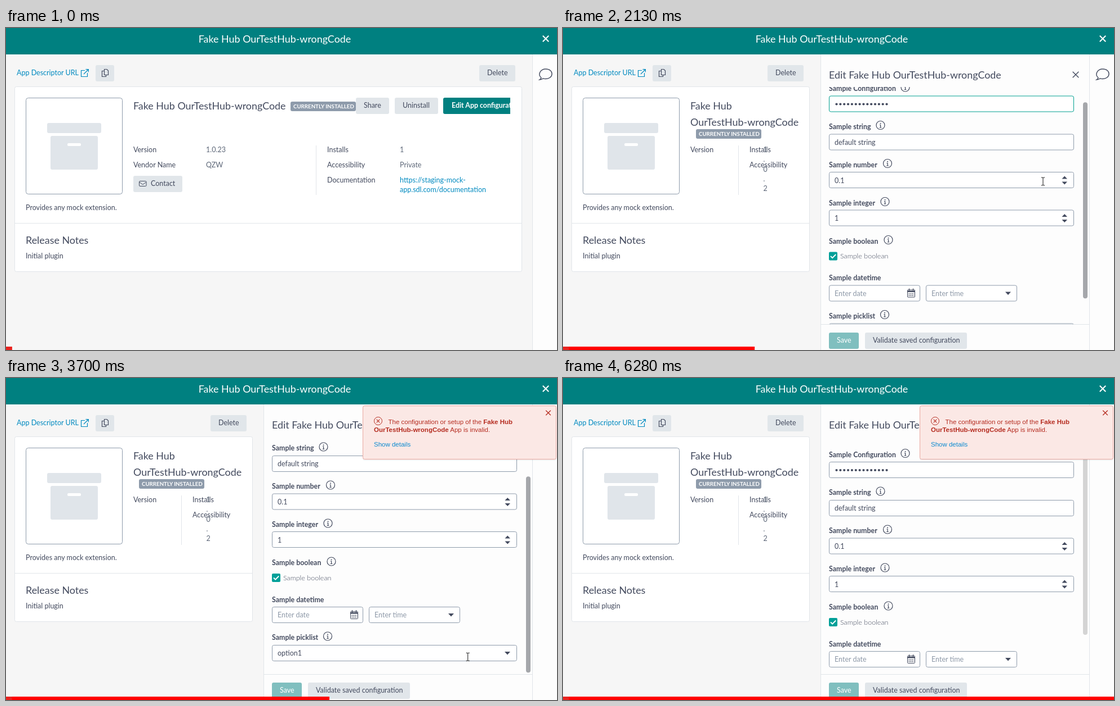
Write an HTML page that moves like this. It is 978 px wide and 573 px high and loops after 6.35 s.

```html
<!DOCTYPE html>
<html lang="en">
<head>
<meta charset="utf-8">
<title>App configuration</title>
<style>
html, body { margin: 0; width: 100%; height: 100%; overflow: hidden; background: #f6f6f6; }
svg { display: block; width: 978px; height: 573px; }
text { font-family: Lato, sans-serif; font-size: 12.5px; fill: #434a5e; white-space: pre; }
.title { font-size: 17.9px; }
.bold { font-size: 12.4px; font-weight: 700; }
.thin { font-weight: 300; }
.badge { font-size: 9.7px; font-weight: 700; fill: #fff; }
.soft { fill: #5d6778; }
.hint { fill: #8e99a8; }
.link { fill: #008ac0; }
.white { fill: #fff; }
.alert { font-family: "Liberation Sans", Arial, sans-serif; font-size: 11.5px; fill: #b52c20; }
.alert.link { fill: #0a8ad0; }
.strong { font-weight: 700; }
</style>
</head>
<body>
<svg id="stage" viewBox="0 0 978 573" xmlns="http://www.w3.org/2000/svg"></svg>
<script>
const LOOP = 6350, STEPS = 92, W = 978;
const INK = '#434a5e', LINE = '#e1e5e9', EDGE = '#8e9bab', TEAL = '#008080', GREY = '#e1e6ea';
const KIND = 'Fake Hub', KEY = 'OurTestHub-wrongCode', NAME = KIND + ' ' + KEY;

// Recorder clock: [ms, step]
const CLOCK = [[0, 0], [70, 1], [680, 10], [1360, 20], [2060, 30], [2740, 40], [3360, 49], [3450, 50],
  [4060, 59], [4760, 69], [5450, 79], [6140, 89], [6280, 91], [LOOP, STEPS]];
const SCROLL = [[29, 0], [31, 28.5], [34, 79], [64, 79], [69, 17], [71, 0]];
const MOUSE_X = [[4, 926], [10, 908], [14, 845], [21, 845], [31, 852], [38, 699], [46, 699], [54, 837],
  [60, 882], [69, 879], [80, 880], [87, 944]];
const MOUSE_Y = [[4, 573], [10, 396], [14, 135], [21, 135], [31, 273], [38, 554], [46, 554], [54, 488],
  [60, 414], [69, 410], [80, 415], [87, 573]];

function at(keys, x) {
  if (x <= keys[0][0]) return keys[0][1];
  for (let i = 1; i < keys.length; i++) {
    const [x0, y0] = keys[i - 1], [x1, y1] = keys[i];
    if (x <= x1) return y0 + (y1 - y0) * (x - x0) / (x1 - x0);
  }
  return keys[keys.length - 1][1];
}

const text = (x, y, s, cls = '', extra = '') => `<text x="${x}" y="${y}" class="${cls}" ${extra}>${s}</text>`;
const rect = (x, y, w, h, fill, r = 0, stroke = 'none') =>
  `<rect x="${x}" y="${y}" width="${w}" height="${h}" rx="${r}" fill="${fill}" stroke="${stroke}"/>`;
const stroke = (d, color = INK, w = 1.2, extra = '') =>
  `<path d="${d}" fill="none" stroke="${color}" stroke-width="${w}" ${extra}/>`;
const shape = (d, fill = INK) => `<path d="${d}" fill="${fill}"/>`;
const cross = (x, y, r, color, w) => stroke(`M${x - r} ${y - r}l${2 * r} ${2 * r}m0 ${-2 * r}l${-2 * r} ${2 * r}`, color, w);
const button = (x, y, w, label, dx = 14, fill = GREY, cls = '') =>
  rect(x, y, w, 29, fill, 3) + text(x + dx, y + 18, label, cls);
const badge = (x, y) => rect(x, y, 116, 17, EDGE, 3) + text(x + 5, y + 12, 'CURRENTLY INSTALLED', 'badge');

function shell() {
  return rect(0, 0, W, 573, '#f6f6f6') + rect(935, 47, 43, 526, '#fdfdfd') +
    stroke('M934.5 47V573', LINE, 1) + rect(0, 0, W, 47, TEAL) +
    text(477, 26, NAME, 'title white', 'text-anchor="middle"') + cross(958, 19, 5.2, '#fff', 2) +
    stroke('M950 88.500C943 82 949 73 958 73C965 73 969 77 969 81.500C969 87 964 90.500 958 90.500Q955.500 90.500 953.500 89.800Q950.500 92 947 92Q949.500 90.500 950 88.500Z', INK, 1.4);
}

function leftSide(open) {
  const right = open ? 437 : 915;
  return text(19, 84, 'App Descriptor URL', 'link') +
    stroke('M140 75.500H133.500V86.500H144.500V80M138 82L146 74M141.500 73.600H146.300V78.500', '#008ac0', 1.2) +
    rect(159, 66, 33, 29, GREY, 3) +
    stroke('M174.500 73.500H179L181.500 76V83.500H174.500ZM174 76.500H170.500V86.500H177.500V84', INK, 1.2) +
    button(open ? 363 : 840, 66, 64, 'Delete') +
    rect(15.5, 104.5, right - 15, 329, '#fff', 3, LINE) + stroke(`M16 347.500H${right}`, LINE, 1) +
    rect(35.5, 124.5, 171, 171, '#fff', 4, EDGE) +
    rect(73, 169, 96, 18, '#e0e5ea', 3) + rect(79, 192, 84, 60, '#e0e5ea', 3) + rect(109, 205, 24, 5, '#fff', 2) +
    text(35, 324, 'Provides any mock extension.') +
    text(35, 384, 'Release Notes', 'title') + text(35, 410, 'Initial plugin') +
    (open ? narrowDetails() : wideDetails());
}

function wideDetails() {
  const rows = [[226, 221, 'Version'], [226, 248, 'Vendor Name'], [570, 221, 'Installs'],
    [570, 248, 'Accessibility'], [570, 275, 'Documentation']];
  const values = [[355, 221, '1.0.23'], [355, 248, 'QZW'], [699, 221, '1'], [699, 248, 'Private']];
  return text(226, 145, NAME, 'title') + badge(505, 131) +
    button(621, 124, 59, 'Share') + button(690, 124, 77, 'Uninstall') +
    `<g clip-path="url(#card)">${button(776, 124, 160, 'Edit App configuration', 15, TEAL, 'bold white')}</g>` +
    rows.map(r => text(...r)).join('') + values.map(v => text(...v, 'soft')).join('') +
    text(699, 275, 'https://staging-mock-', 'link') + text(699, 292, 'app.sdl.com/documentation', 'link') +
    stroke('M550.500 209V297', LINE, 1) + button(226, 263, 87, 'Contact', 31) +
    rect(236.5, 272.5, 12.5, 9, 'none', 1.5, INK) + stroke('M237 274.500L242.750 278.500L248.500 274.500', INK, 1);
}

function narrowDetails() {
  return text(226, 145, KIND, 'title') + text(226, 174, KEY, 'title') + badge(236, 180) +
    text(226, 221, 'Version') + text(331, 221, 'Installs') + text(331, 248, 'Accessibility') +
    stroke('M311.500 209V297', LINE, 1) +
    [...'1.0.2'].map((c, i) => text(355.5, 221 + i * 17.25, c, 'soft')).join('');
}

const input = (x, y, w, edge = EDGE) => rect(x + .5, y + .5, w - 1, 28, '#fff', 3, edge);
const down = (x, y) => shape(`M${x - 5} ${y}h10l-5 5.500z`);
const spinButtons = y => shape(`M885.500 ${y - 2.5}h9.500l-4.750 -5z`) + shape(`M885.500 ${y + 2.5}h9.500l-4.750 5z`);

function label(y, s, iconX) {
  const icon = iconX ? `<circle cx="${iconX}" cy="${y - 2}" r="7.500" fill="none" stroke="${INK}" stroke-width="1.200"/>` +
    rect(iconX - .8, y - 6, 1.7, 1.7, INK) +
    stroke(`M${iconX - 1.5} ${y - 2.5}h1.600v4.500m-1.800 0h3.500`, INK, 1.2) : '';
  return text(472, y + 4.5, s, 'bold') + icon;
}

function form(focused, caret) {
  let dots = '';
  for (let i = 0; i < 14; i++) dots += `<circle cx="${485.5 + i * 6.85}" cy="164" r="2.100" fill="${INK}"/>`;
  return label(136, 'Sample Configuration', 607.5) + input(472, 149, 435, focused ? '#00a090' : EDGE) + dots +
    (caret ? stroke('M482.500 156V172', '#222', 1) : '') +
    label(203.5, 'Sample string', 563.5) + input(472, 217, 435) + text(482, 236, 'default string') +
    label(271.5, 'Sample number', 576) + input(472, 284.5, 435) + text(482, 304, '0.1') + spinButtons(299.5) +
    label(339.5, 'Sample integer', 571.5) + input(472, 352, 435) + text(482, 371.5, '1') + spinButtons(367) +
    label(407.5, 'Sample boolean', 577.5) + rect(472, 427, 15, 15, '#00a099', 2) +
    stroke('M475 434.500l3.200 3.200l6 -6.200', '#fff', 1.8) + text(492, 438.5, 'Sample boolean', 'thin') +
    label(473, 'Sample datetime') + input(472, 486, 162) + text(482, 505, 'Enter date', 'hint') + calendar() +
    input(644, 486, 162) + text(654, 505, 'Enter time', 'hint') + down(790, 498) +
    label(540.5, 'Sample picklist', 571) + input(472, 554, 435) + text(482, 573, 'option1') + down(890, 566);
}

function calendar() {
  return rect(611.5, 494.5, 13, 13, 'none', 1, INK) + rect(611.5, 496, 13, 2.5, INK) +
    stroke('M614.500 492V496M621.500 492V496', INK, 1.3) +
    stroke('M613.500 501.500H623M613.500 504.500H623', INK, 1.6, 'stroke-dasharray="1.700 1.200"');
}

function panel(k) {
  const scroll = at(SCROLL, k), busy = k >= 41 && k <= 47;
  return rect(457, 47, 477, 526, '#fdfdfd') + stroke('M457.500 47V573', LINE, 1) +
    text(472, 90, 'Edit ' + NAME, 'title') + cross(910, 83, 5.3, INK, 1.4) +
    `<g clip-path="url(#view)"><g transform="translate(0 ${-scroll})">${form(k < 39, k < 39 && (k - 16) % 16 < 8)}</g></g>` +
    rect(923, 108 + scroll * .85, 8, 349, k < 90 ? '#a5a7ab' : '#d4d4d4', 4) +
    stroke('M458 527.500H934', LINE, 1) +
    button(472, 542, 53, 'Save', 14, '#80bfbf', 'white') + button(536, 542, 181, 'Validate saved configuration') +
    (busy ? rect(458, 47, 476, 526, 'rgba(253,253,253,.42)') + spinner(k) : '');
}

function spinner(k) {
  return stroke('M-12.500 6.400A14 14 0 1 1 7.800 11.600', TEAL, 2,
    `transform="translate(695 316) rotate(${(k - 44) * 40})"`);
}

function alertBox(k) {
  const alpha = Math.min(1, (k - 47) / 4);
  return `<g opacity="${alpha}">` + rect(633, 49, 344, 98, 'rgba(0,0,0,.05)', 4) +
    rect(633.5, 49.5, 343, 95, '#fbe8e5', 3, '#e9a8a1') +
    `<circle cx="660.500" cy="76.500" r="7" fill="none" stroke="#b52c20"/>` + cross(660.5, 76.5, 2.8, '#b52c20', 1.1) +
    text(678.5, 82, `The configuration or setup of the <tspan class="strong">${KIND}</tspan>`, 'alert') +
    text(653, 95.5, `<tspan class="strong">${KEY}</tspan> App is invalid.`, 'alert') +
    text(653, 122, 'Show details', 'alert link') + cross(962.5, 62, 4.3, '#b52c20', 1.3) + '</g>';
}

function cursor(k) {
  if (k < 4 || k > 86) return '';
  const beam = (k >= 23 && k <= 33) || (k >= 51 && k <= 56);
  const d = beam ? 'M-3 -7h2.300l.7 .7l.7 -.7h2.300M0 -6.500v13M-3 7h2.300l.7 -.7l.7 .7h2.300' :
    'M.500 .500V15.500L4 12.200L6.600 18L9.200 16.900L6.700 11.200H11Z';
  return `<path d="${d}" fill="${beam ? 'none' : '#fff'}" stroke="#111" transform="translate(${at(MOUSE_X, k)} ${at(MOUSE_Y, k)})"/>`;
}

function progress(k) {
  const step = W / STEPS;
  return rect(0, 567, step * (k + 1), 6, '#ff0000') + rect(0, 567, step, 6, '#e8231f');
}

const stage = document.getElementById('stage');
const clips = '<defs><clipPath id="card"><rect x="776" y="120" width="119" height="40"/></clipPath>' +
  '<clipPath id="view"><rect x="458" y="105" width="465" height="422"/></clipPath></defs>';
let shown = -1;

function draw(time) {
  const k = Math.min(STEPS - 1, Math.floor(at(CLOCK, time % LOOP) + .03));
  if (k === shown) return;
  shown = k;
  const open = k >= 16;
  stage.innerHTML = clips + shell() + leftSide(open) + (open ? panel(k) : '') +
    (k > 47 ? alertBox(k) : '') + cursor(k) + progress(k);
}

const start = performance.now();
function tick() {
  draw(performance.now() - start);
  requestAnimationFrame(tick);
}
tick();
</script>
</body>
</html>
```
